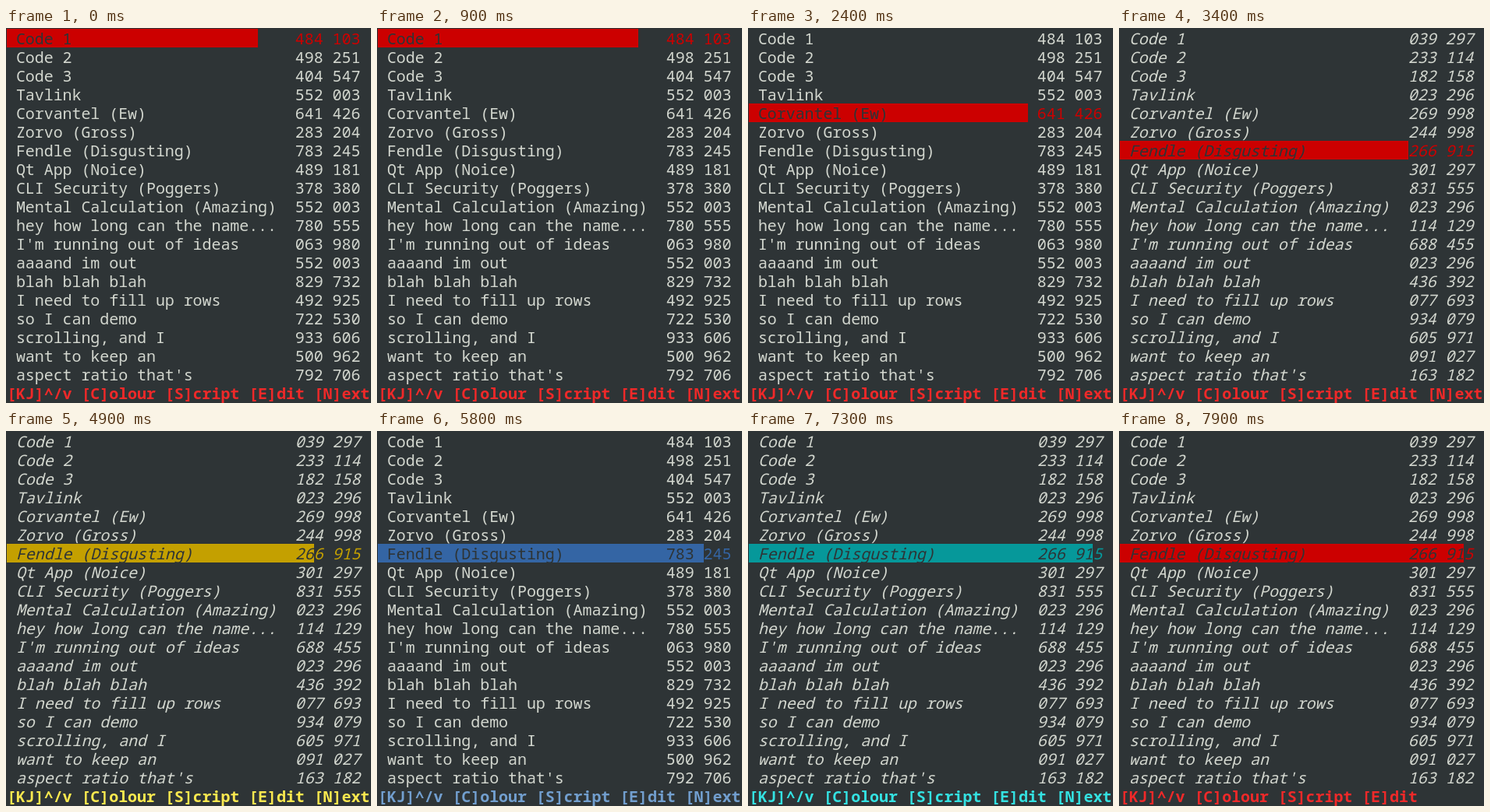
An HTML page with a canvas for the animation above (8000 ms loop, 468 by 482 pixels).

```html
<!DOCTYPE html>
<html lang="en">
<head>
<meta charset="utf-8">
<title>Terminal code list</title>
<style>
html, body { margin: 0; width: 468px; height: 482px; overflow: hidden; background: #2e3436; }
canvas { display: block; }
</style>
</head>
<body>
<canvas id="screen" width="468" height="482"></canvas>
<script>
const ctx = document.getElementById('screen').getContext('2d');
const LOOP = 8000, CELL = 11.93, LINE = 24, LEFT = 1, TOP = 1;
const BACK = '#2e3436', TEXT = '#d3d7cf';
const FONT = '20px "Noto Sans Mono", "DejaVu Sans Mono", monospace';

// label | current code | next code
const rows = `Code 1|484 103|039 297
Code 2|498 251|233 114
Code 3|404 547|182 158
Tavlink|552 003|023 296
Corvantel (Ew)|641 426|269 998
Zorvo (Gross)|283 204|244 998
Fendle (Disgusting)|783 245|266 915
Qt App (Noice)|489 181|301 297
CLI Security (Poggers)|378 380|831 555
Mental Calculation (Amazing)|552 003|023 296
hey how long can the name...|780 555|114 129
I'm running out of ideas|063 980|688 455
aaaand im out|552 003|023 296
blah blah blah|829 732|436 392
I need to fill up rows|492 925|077 693
so I can demo|722 530|934 079
scrolling, and I|933 606|605 971
want to keep an|500 962|091 027
aspect ratio that's|792 706|163 182`.split('\n').map(line => line.split('|'));

// [bar, footer] colour pairs
const themes = [
  ['#cc0000', '#ef2929'], ['#4e9a06', '#8ae234'], ['#c4a000', '#fce94f'],
  ['#3465a4', '#729fcf'], ['#75507b', '#ad7fa8'], ['#06989a', '#34e2e2']
];

// key presses, in ms
const downKeys = [1300, 1900, 2100, 2300, 2500, 2700];
const nextKeys = [3000, 5100, 6600];
const colourKeys = [3900, 4500, 5200, 6000, 6800, 7500];
const pressed = (keys, t) => keys.filter(k => t >= k).length;

function print(text, col, row, colour) {
  [...text].forEach((ch, i) => {
    ctx.fillStyle = typeof colour === 'function' ? colour(col + i) : colour;
    ctx.fillText(ch, LEFT + (col + i) * CELL, TOP + row * LINE + 20);
  });
}

function draw(t) {
  const selected = pressed(downKeys, t);
  const next = pressed(nextKeys, t) % 2;
  const [bar, bright] = themes[pressed(colourKeys, t) % themes.length];
  const filled = Math.floor(27.54 + t * 39 / 30000);

  ctx.fillStyle = BACK;
  ctx.fillRect(0, 0, 468, 482);
  ctx.fillStyle = bar;
  ctx.fillRect(LEFT, TOP + selected * LINE, Math.round(filled * CELL), LINE);

  ctx.font = (next ? 'italic ' : '') + FONT;
  rows.forEach(([label, ...codes], i) => {
    const colour = i === selected ? col => col < filled ? BACK : bar : TEXT;
    print(label, 1, i, colour);
    print(codes[next], 31, i, colour);
  });

  ctx.font = 'bold ' + FONT;
  print('[KJ]^/v [C]olour [S]cript [E]dit' + (t < 7850 ? ' [N]ext' : ''), 0, rows.length, bright);
}

const start = performance.now();
function tick() {
  draw((performance.now() - start) % LOOP);
  requestAnimationFrame(tick);
}
tick();
</script>
</body>
</html>
```
